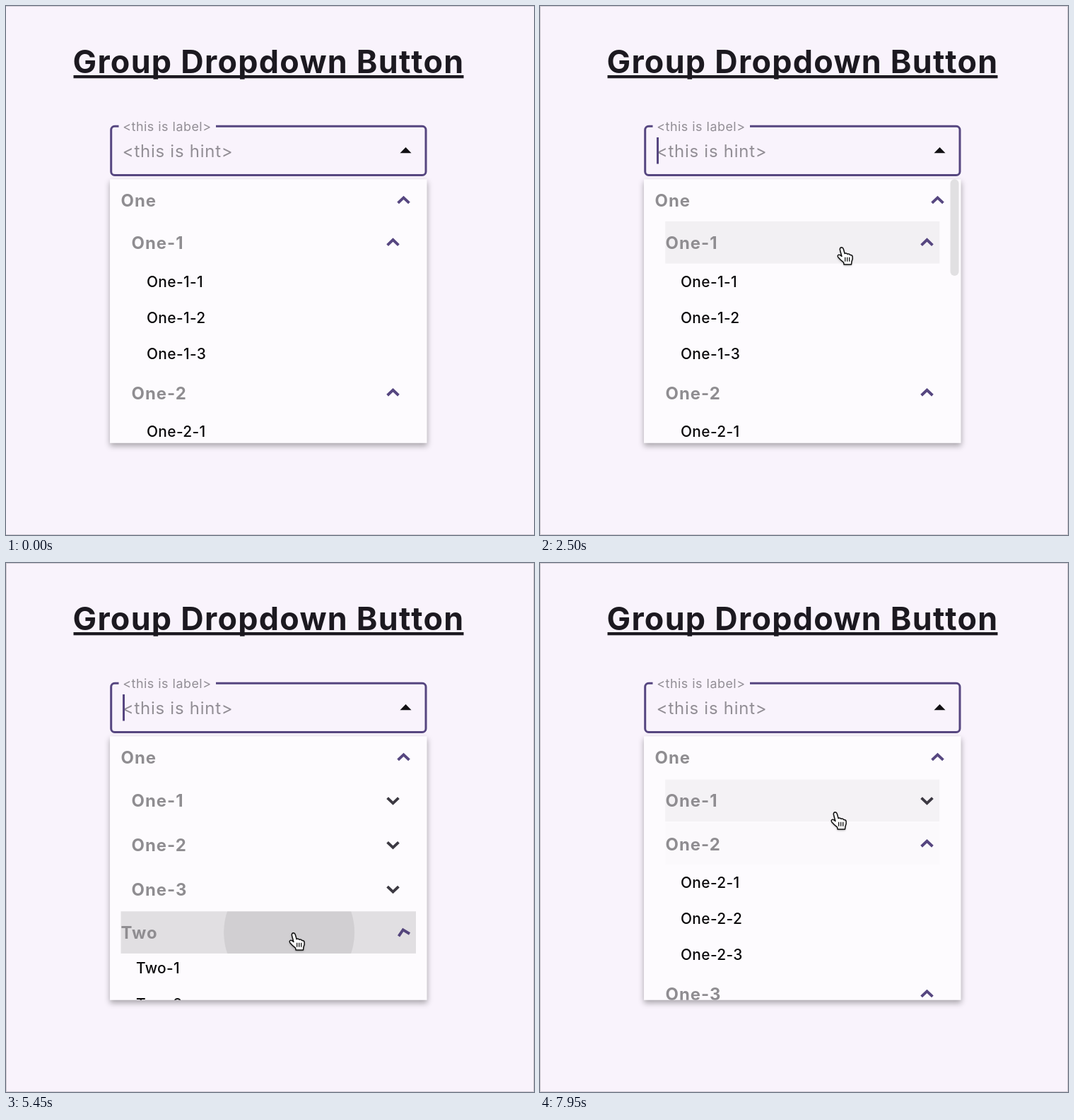
An HTML page with a canvas for the animation above (8 s loop, 747 by 749 pixels).

```html
<!DOCTYPE html>
<html lang="en">
<head>
<meta charset="utf-8">
<title>Group Dropdown Button</title>
<style>
html, body { margin: 0; width: 100%; height: 100%; overflow: hidden; background: #f9f3fc; }
canvas { display: block; }
</style>
</head>
<body>
<canvas id="stage" width="747" height="749"></canvas>
<script>
const ctx = document.getElementById('stage').getContext('2d');
const LOOP = 8000, STEP = 50;
const FONT = 'Inter, "Open Sans", sans-serif';
const PANEL = { x: 147, y: 245.3, w: 448.5, h: 373.5 };
const HEAD = 59.7, ITEM = 51, GAP = 1.5;
const BACK = '#f9f3fc', PURPLE = [86, 70, 128], DARK = [60, 57, 66];

const kids = (name, n) => Array.from({ length: n }, (_, i) => `${name}-${i + 1}`);
const GROUPS = [
  ...kids('One', 3).map(name => ({ name, depth: 1, items: kids(name, 3) })),
  { name: 'Two', depth: 0, items: kids('Two', 3) },
  { name: 'Three', depth: 0, items: kids('Three', 1) }
];

// Header taps: release time, group
const TAPS = [
  [2700, 'One-1'], [3350, 'One-2'], [4450, 'One-3'], [5442, 'Two'],
  [6150, 'Two'], [6900, 'One-3'], [7450, 'One-2']
];
// Pointer stops: time, x, y
const POINTER = [
  [50, 765, 470], [500, 487, 412], [1600, 487, 412], [2300, 427, 343],
  [2750, 427, 343], [3000, 415, 395], [3400, 415, 395], [3750, 407, 479],
  [4550, 407, 479], [4850, 407, 525], [6200, 407, 525], [6500, 424, 458],
  [6950, 424, 458], [7250, 420, 405], [7840, 420, 405], [7950, 418, 354]
];
const SCROLL = [[650, 0], [1200, 229], [1600, 229], [2200, 0]];

const clamp = v => Math.max(0, Math.min(1, v));
const mix = (a, b, u) => a + (b - a) * u;
const smooth = u => u * u * (3 - 2 * u);

function track(stops, t, col) {
  const i = stops.findIndex(s => s[0] > t);
  if (i === 0) return stops[0][col];
  if (i < 0) return stops[stops.length - 1][col];
  const a = stops[i - 1], b = stops[i];
  return mix(a[col], b[col], smooth((t - a[0]) / (b[0] - a[0])));
}

// How far a group is unfolded, 0 to 1
function openness(name, t) {
  const past = TAPS.filter(([time, key]) => key === name && time <= t);
  if (!past.length) return 1;
  const u = clamp((t - past[past.length - 1][0]) / 200);
  return Math.pow(past.length % 2 ? 1 - u : u, 1.7);
}

function layout(t) {
  const rows = [];
  let y = PANEL.y - track(SCROLL, t, 1);
  const start = y;
  const head = (name, depth, open) => {
    rows.push({ name, head: true, y, h: HEAD, open, textX: 162.5 + 15 * depth,
      chevX: 562.5 - 15 * depth, x: 162.5 + 14.7 * depth, w: 417.5 - 29.4 * depth });
    y += HEAD;
  };
  head('One', 0, 1);
  for (const { name, depth, items } of GROUPS) {
    const open = openness(name, t);
    const full = items.length * ITEM, shown = full * open;
    y += GAP * (1 - open);
    head(name, depth, open);
    if (open > 0) items.forEach((item, i) => rows.push({
      name: item, y: y - (full - shown) / 2 + i * ITEM, h: ITEM, clip: [y, shown],
      textX: 184 + 15 * depth, x: 162.5 + 14.7 * depth, w: 417.5 - 29.4 * depth
    }));
    y += shown + GAP * (1 - open);
  }
  return { rows, height: y - start, offset: PANEL.y - start };
}

function hovered(t) {
  const x = track(POINTER, t, 1), y = track(POINTER, t, 2);
  const row = layout(t).rows.find(r =>
    x >= r.x && x < r.x + r.w && y >= r.y && y < r.y + r.h);
  return row && row.name;
}

function text(str, x, y, size, color, spacing, weight = 400) {
  ctx.font = `${weight} ${size}px ${FONT}`;
  ctx.letterSpacing = spacing + 'px';
  ctx.fillStyle = color;
  ctx.fillText(str, x, y);
}

function box(x, y, w, h, fill) {
  ctx.fillStyle = fill;
  ctx.fillRect(x, y, w, h);
}

function clipTo(x, y, w, h) {
  ctx.beginPath();
  ctx.rect(x, y, w, h);
  ctx.clip();
}

function chevron(x, y, open) {
  ctx.save();
  ctx.translate(x, y);
  ctx.rotate(Math.PI * open);
  ctx.strokeStyle = `rgb(${DARK.map((c, i) => Math.round(mix(c, PURPLE[i], open)))})`;
  ctx.lineWidth = 3.9;
  ctx.beginPath();
  ctx.moveTo(-7.9, -3.7);
  ctx.lineTo(0, 3.8);
  ctx.lineTo(7.9, -3.7);
  ctx.stroke();
  ctx.restore();
}

function ink(row, t) {
  for (const [time, name] of TAPS) {
    const dt = t - time;
    if (name !== row.name || dt < -110 || dt > 375) continue;
    const press = clamp((dt + 110) / 80) * (1 - clamp((dt - 20) / 200));
    box(row.x, row.y, row.w, row.h, `rgba(0,0,0,${0.07 * press})`);
    const grow = dt < 0 ? 0.24 * (1 + dt / 110) : mix(0.24, 1, smooth(clamp(dt / 225)));
    const fade = clamp((dt + 110) / 75) * (1 - clamp((dt - 225) / 150));
    ctx.save();
    clipTo(row.x, row.y, row.w, row.h);
    ctx.fillStyle = `rgba(0,0,0,${0.07 * fade})`;
    ctx.beginPath();
    ctx.arc(mix(track(POINTER, time, 1) + 3, row.x + row.w / 2, grow),
      row.y + row.h / 2, mix(50, 225, grow), 0, 7);
    ctx.fill();
    ctx.restore();
  }
}

function drawRow(row, t, trail) {
  ctx.save();
  if (row.clip) clipTo(PANEL.x, row.clip[0], PANEL.w, row.clip[1]);
  const hover = trail.filter(n => n === row.name).length / trail.length;
  if (hover) box(row.x, row.y, row.w, row.h, `rgba(0,0,0,${0.045 * hover})`);
  const mid = row.y + row.h / 2;
  if (row.head) {
    ink(row, t);
    text(row.name, row.textX, mid + 9.1, 23.9, '#8f8d91', 1, 700);
    chevron(row.chevX, mid, row.open);
  } else {
    text(row.name, row.textX, mid + 7.4, 20.9, '#0b0a0c', 0.35, 500);
  }
  ctx.restore();
}

function drawField(t) {
  ctx.strokeStyle = `rgb(${PURPLE})`;
  ctx.lineWidth = 3;
  ctx.beginPath();
  ctx.roundRect(148.7, 170.3, 445.3, 69.2, 5);
  ctx.stroke();
  box(159.5, 167, 137.5, 6, BACK);
  text('<this is label>', 165.2, 177.3, 17.9, '#928e95', 0.5);
  text('<this is hint>', 164.8, 214, 23.9, '#928e95', 0.78);
  ctx.fillStyle = '#121014';
  ctx.beginPath();
  ctx.moveTo(557.5, 208.3);
  ctx.lineTo(565.5, 200);
  ctx.lineTo(573.5, 208.3);
  ctx.fill();
  const blink = t % 1000;
  if (blink >= 100 && blink < 600) box(165, 186, 3, 37.5, `rgb(${PURPLE})`);
}

function drawPanel(t) {
  ctx.save();
  ctx.shadowColor = 'rgba(0,0,0,.32)';
  ctx.shadowBlur = 8;
  ctx.shadowOffsetY = 4;
  box(PANEL.x, PANEL.y, PANEL.w, PANEL.h, '#fdfbfe');
  ctx.restore();

  ctx.save();
  clipTo(PANEL.x, PANEL.y, PANEL.w, PANEL.h);
  const { rows, height, offset } = layout(t);
  const trail = [0, 10, 20, 30, 40].map(d => hovered(t - d));
  rows.forEach(row => drawRow(row, t, trail));

  const bar = clamp((t - 650) / 100) * (1 - clamp((t - 2800) / 300));
  if (bar) {
    const ratio = PANEL.h / height;
    ctx.fillStyle = `rgba(0,0,0,${0.108 * bar})`;
    ctx.beginPath();
    ctx.roundRect(580.5, PANEL.y + offset * ratio, 12, PANEL.h * ratio, 6);
    ctx.fill();
  }
  ctx.restore();
}

const HAND = new Path2D('M-2 2.5Q-2-.6.4-.6Q2.3-.5 3 2L4.8 8.2Q7.4 7 8.6 9' +
  'Q11.3 8 12.4 10.3Q15.2 9.8 15.8 12.5Q16.5 15.5 14.6 19.8L14.2 23.7L3.8 23.7' +
  'L3.3 20.8Q-1 17.5-4.5 13.4Q-6 10.6-3.6 10Q-1.8 9.8.6 12.2Z');
const CREASES = new Path2D('M5.4 13.5V19.5M8.4 13.5V19.5M11.4 13.5V19.5');

function drawPointer(t) {
  if (t < POINTER[0][0]) return;
  ctx.save();
  ctx.translate(track(POINTER, t, 1) - 0.7, track(POINTER, t, 2) - 0.7);
  ctx.save();
  ctx.shadowColor = 'rgba(0,0,0,.35)';
  ctx.shadowBlur = 3;
  ctx.shadowOffsetY = 1.5;
  ctx.fillStyle = '#fff';
  ctx.fill(HAND);
  ctx.restore();
  ctx.strokeStyle = '#111';
  ctx.lineJoin = 'round';
  ctx.lineWidth = 1.5;
  ctx.stroke(HAND);
  ctx.lineWidth = 1.3;
  ctx.stroke(CREASES);
  ctx.restore();
}

function draw(t) {
  box(0, 0, 747, 749, BACK);
  const edge = 'rgba(0,0,0,.16)';
  box(0, 0, 747, 1, edge);
  box(0, 748, 747, 1, edge);
  if (t >= STEP) {
    box(0, 1, 1, 747, edge);
    box(746, 1, 1, 747, edge);
  }
  text('Group Dropdown Button', 94.5, 95, 44.8, '#1c1920', 1.3, 700);
  box(95.5, 98, 552, 4.3, '#1c1920');
  drawField(t);
  drawPanel(t);
  drawPointer(t);
}

const began = performance.now();
function tick() {
  const t = (performance.now() - began) % LOOP;
  draw(Math.floor(t / STEP) * STEP);
  requestAnimationFrame(tick);
}
tick();
</script>
</body>
</html>
```
